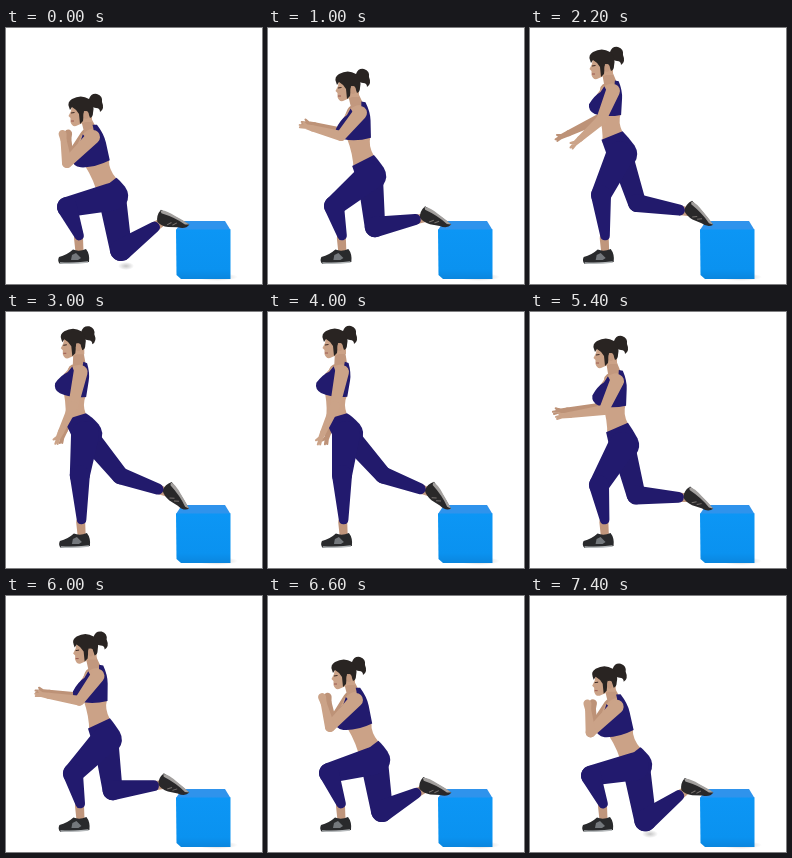
These frames come from a looping animation (256x256 px, 7.6 s). An HTML page:

```html
<!DOCTYPE html>
<html lang="en">
<head>
<meta charset="utf-8">
<title>Split squat</title>
<style>
html, body { margin: 0; width: 100%; height: 100%; overflow: hidden; background: #fff; }
svg { display: block; width: 100%; height: 100%; }
</style>
</head>
<body>
<svg viewBox="0 0 256 256">
  <defs>
    <linearGradient id="front" x1="0" y1="0" x2="0" y2="1">
      <stop offset="0" stop-color="#0c96f5"/><stop offset=".8" stop-color="#0a92f0"/><stop offset="1" stop-color="#0a86de"/>
    </linearGradient>
    <radialGradient id="soft">
      <stop offset="0" stop-color="#999" stop-opacity=".55"/><stop offset="1" stop-color="#999" stop-opacity="0"/>
    </radialGradient>
  </defs>
  <ellipse cx="211" cy="249" rx="21" ry="4" fill="url(#soft)"/>
  <ellipse id="kneeShade" cx="120" cy="238" rx="8" ry="4" fill="url(#soft)"/>
  <path fill="#2f93ec" d="M176 193H219L224.500 202H170Z"/>
  <path fill="url(#front)" d="M170 201.500H224.500V251H175L170.500 247Z"/>

  <g id="farArm" fill="#bd9277"><path/><path/><path/></g>
  <path id="backAnkle" fill="#c49a80"/>
  <g id="backShoe">
    <path fill="#292829" d="M1 0Q0 6-8 7.500L-17 11.500Q-24 13.500-29 11.500Q-33 6-31-1L-15-1Z"/>
    <path fill="#a3a09e" d="M-31 0Q-27-3-15-1.500Q-5-1 1 0L-3 2Q-15 0-29 2Z"/>
    <path fill="none" stroke="#77716e" d="M-14 8-11 4M-19 10-16 6"/>
  </g>
  <g id="backLeg" fill="#221a6c"><path/><path/></g>
  <path id="frontAnkle" fill="#c0967c"/>
  <g id="frontShoe">
    <path fill="#292a2c" d="M53 229Q61 227 67 221.500Q73 224 80 221Q84 226 83 234L54 236Q51 233 53 229Z"/>
    <path fill="#74787c" d="M66 227 70 225 75 230 72 232 65 232Z"/>
    <path fill="none" stroke="#b4b8ba" stroke-width="1.500" d="M54 235Q67 236 82 234"/>
  </g>
  <path id="neck" fill="#c2987e"/>
  <path id="torso" fill="#cba287"/>
  <path id="top" fill="#221b6e"/>
  <g id="frontLeg" fill="#221a6e"><path/><path/><path/></g>
  <g id="head">
    <path fill="#292422" d="M9-11Q11-17 17-16Q23-14 22-8Q25-1 20 2Q20-2 16-2Q11-3 9-6Z"/>
    <path fill="#cba287" d="M-8-6-9 1-11.500 6-9.500 8-9.500 12Q-8 17-4 16L5 12 12 12 12-4Z"/>
    <path fill="#292422" d="M-11-3Q-13-8-8-11Q1-16 9-11Q15-6 13 3Q13 7 10 8L8 2 4 1 3 11 0 14-1 4Q-4-1-8-3L-10 0Z"/>
    <ellipse cx="6" cy="5" rx="2.500" ry="4" fill="#c49a80"/>
    <path stroke="#3a2721" d="M-9 3-5.500 2.500" fill="none"/>
    <path stroke="#9c5850" d="M-9 11-6 11" fill="none"/>
  </g>
  <g id="nearArm" fill="#cba388"><path/><path/><path/></g>
</svg>
<script>
const LOOP = 7600, STEP = 200, TOP = 3600;
const $ = id => document.getElementById(id);

// Pose keys by time away from the standing moment, in ms.
// Pairs: head, shoulder, waist, elbow, hand, far hand, hip, front knee, back knee, heel
const keys = [400, 1400, 1800, 2600, 3000, 3600];
const poses = [
  [66,30, 73,58, 68,104, 67,94, 50,132, 57,132, 79,122, 74,163, 115,163, 163,167],
  [71,35, 82,61, 82,107, 71,92, 41,119, 24,112, 91,126, 71,167, 107,175, 160,172],
  [75,40, 86,67, 87,115, 74,98, 25,105, 21,100, 93,133, 69,173, 106,183, 158,174],
  [79,57, 91,83, 95,132, 73,108, 32,97, 34,94, 102,148, 66,178, 107,199, 155,178],
  [75,77, 87,102, 100,152, 62,131, 53,97, 59,97, 106,164, 61,177, 114,215, 153,181],
  [74,82, 86,107, 100,157, 61,135, 56,102, 62,102, 106,168, 61,179, 115,222, 153,182]
];

const last = keys.length - 1;
const rise = (i, c) => (poses[i + 1][c] - poses[i][c]) / (keys[i + 1] - keys[i]);

function tangent(i, c) {
  if (i === 0) return 0;
  if (i === last) return rise(i - 1, c);
  const a = rise(i - 1, c), b = rise(i, c);
  return a * b > 0 ? 2 * a * b / (a + b) : 0;
}

// Monotone cubic through the keys, held at the top, continued at the bottom.
function channel(u, c) {
  if (u <= keys[0]) return poses[0][c];
  if (u >= keys[last]) return poses[last][c] + (u - keys[last]) * rise(last - 1, c);
  let i = 0;
  while (u > keys[i + 1]) i++;
  const span = keys[i + 1] - keys[i], s = (u - keys[i]) / span, r = 1 - s;
  return poses[i][c] * (1 + 2 * s) * r * r + poses[i + 1][c] * s * s * (3 - 2 * s)
    + span * (tangent(i, c) * s * r * r - tangent(i + 1, c) * s * s * r);
}

const clamp = v => Math.max(0, Math.min(1, v));
const mix = (a, b, k) => [a[0] + (b[0] - a[0]) * k, a[1] + (b[1] - a[1]) * k];
const add = (a, x, y) => [a[0] + x, a[1] + y];
const dist = (a, b) => Math.hypot(b[0] - a[0], b[1] - a[1]);
const angle = (a, b) => Math.atan2(b[1] - a[1], b[0] - a[0]);
const polar = (c, r, t) => add(c, r * Math.cos(t), r * Math.sin(t));
const str = p => p[0].toFixed(2) + ' ' + p[1].toFixed(2);

// Outline around two circles.
function limb(a, ra, b, rb) {
  const t = angle(a, b), f = Math.acos(Math.max(-1, Math.min(1, (ra - rb) / dist(a, b))));
  const wide = f > Math.PI / 2;
  return `M${str(polar(a, ra, t + f))}A${ra} ${ra} 0 ${wide ? 0 : 1} 1 ${str(polar(a, ra, t - f))}`
    + `L${str(polar(b, rb, t - f))}A${rb} ${rb} 0 ${wide ? 1 : 0} 1 ${str(polar(b, rb, t + f))}Z`;
}

const draw = (id, ...paths) => {
  const el = $(id), parts = el.tagName === 'g' ? el.children : [el];
  paths.forEach((d, i) => parts[i].setAttribute('d', d));
};

// A fist is 0 for an open hand and 1 for a closed one.
function arm(id, shoulder, elbow, tip, fist) {
  const wrist = mix(elbow, tip, .7), palm = mix(elbow, tip, .82), a = angle(elbow, tip);
  const finger = (turn, size) => limb(palm, 2, polar(palm, size * (1 - .6 * fist), a + turn), 1);
  draw(id, limb(shoulder, 7, elbow, 5), limb(elbow, 5, wrist, 3),
    limb(wrist, 3, mix(elbow, tip, .88), 2.4 + 1.6 * fist) + finger(0, 8) + finger(-.3, 7.5) + finger(.6, 6));
}

function render(time) {
  const t = Math.floor(time % LOOP / STEP) * STEP;
  let u = Math.abs(t - TOP);
  if (u > LOOP / 2) u = LOOP - u;
  const at = i => [channel(u, 2 * i), channel(u, 2 * i + 1)];
  const [head, shoulder, waist, elbow, hand, farHand, hip, knee, backKnee, heel] =
    Array.from({ length: 10 }, (_, i) => at(i));
  const low = clamp((backKnee[1] - 165) / 50);

  // Torso coordinates: x to the back, y down the spine.
  const len = dist(shoulder, waist), k = len / 48;
  const dx = (waist[0] - shoulder[0]) / len, dy = (waist[1] - shoulder[1]) / len;
  const body = (x, y) => add(shoulder, (x * dy + y * dx) * k, (y * dy - x * dx) * k);
  const P = (x, y) => str(body(x, y));

  draw('neck', limb(shoulder, 7, add(head, 6, 9), 5));
  draw('torso', `M${P(-10, -2)}Q${P(3, -10)} ${P(9, -1)}L${P(9, 26)}Q${P(6, 35)} ${P(11, 45)}`
    + `L${P(-10, 56)}Q${P(-9, 42)} ${P(-14, 25)}L${P(-16, 6)}Z`);
  draw('top', `M${P(3, -9)}L${P(7, -8)}Q${P(11, 2)} ${P(10.5, 10)}L${P(9.5, 27)}Q${P(-6, 30)} ${P(-18, 26)}`
    + `Q${P(-25, 23)} ${P(-24, 16)}Q${P(-19, 7)} ${P(-12, 3)}L${P(-8, -3)}L${P(-4, 5)}Q${P(3, 4)} ${P(3, -9)}Z`);

  const up = angle(hip, waist);
  draw('frontLeg',
    `M${P(-11, 53)}L${P(11, 44)}Q${str(polar(hip, 18.5, up + .85))} ${str(polar(hip, 16, up + 1.45))}`
      + `A16 16 0 0 1 ${str(polar(hip, 16, up + 2.6))}L${str(polar(hip, 14, up - 1.7))}Z`,
    limb(add(hip, -1, 1), 14, knee, 10),
    limb(knee, 10, [73 + (knee[0] - 61) * .2, 207.5], 4.8));
  const foot = [73.500 + (knee[0] - 61) * .17, 224];
  draw('frontAnkle', limb(add(foot, -1, -14), 4.5, foot, 4));

  const toe = [182.5, 196], turn = angle(heel, toe);
  const ankle = polar(polar(toe, -24, turn), 8, turn + Math.PI / 2);
  const cuff = polar(ankle, 11, angle(ankle, backKnee));
  const kneeSize = 8.5 + 2.5 * low;
  draw('backLeg', limb(mix(hip, backKnee, .13), 10.5 + 3 * low, backKnee, kneeSize),
    limb(backKnee, kneeSize, cuff, 5.5));
  draw('backAnkle', limb(cuff, 4.8, ankle, 4.2));
  $('backShoe').setAttribute('transform', `translate(${str(toe)}) rotate(${turn * 180 / Math.PI})`);
  $('kneeShade').setAttribute('opacity', clamp((backKnee[1] - 217) / 5));
  $('frontShoe').setAttribute('transform', `translate(${((knee[0] - 61) * .07).toFixed(2)} 0)`);
  $('head').setAttribute('transform', `translate(${str(head)})`);

  const fist = clamp((u - 2600) / 400);
  arm('farArm', add(shoulder, -5, 1), add(elbow, 2, -3), farHand, fist);
  arm('nearArm', add(shoulder, 1, 2), elbow, hand, fist);
}

const start = performance.now();
function tick() {
  render(performance.now() - start);
  requestAnimationFrame(tick);
}
tick();
</script>
</body>
</html>
```
